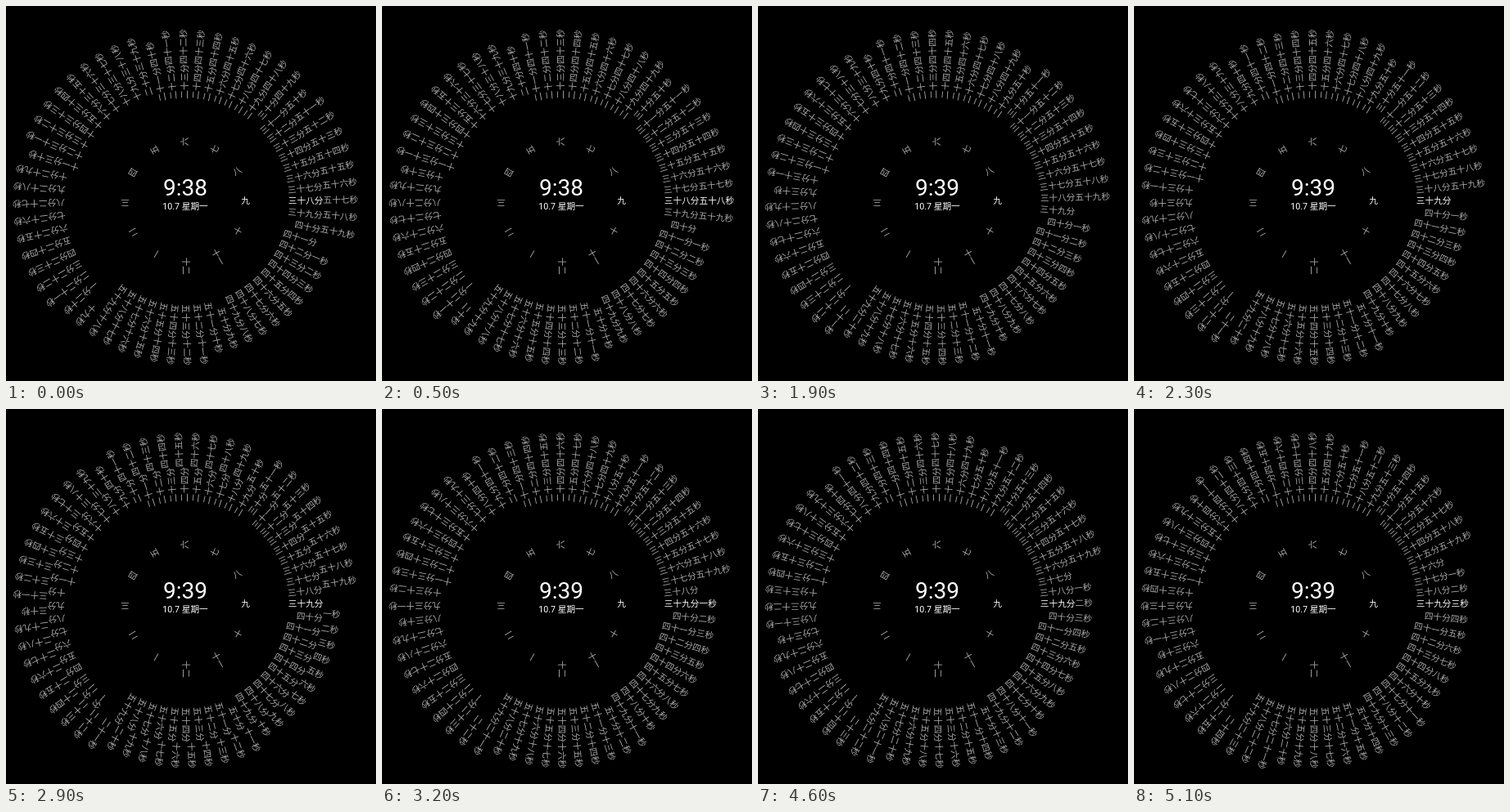
An HTML page with a canvas that plays this animation: 452 by 459 pixels, repeating every 5.4 s.

```html
<!DOCTYPE html>
<html lang="zh-CN">
<head>
<meta charset="utf-8">
<title>文字时钟</title>
<style>
  html, body { margin: 0; width: 100%; height: 100%; overflow: hidden; background: #000; }
  canvas { display: block; width: 452px; height: 459px; }
</style>
</head>
<body>
<canvas id="clock"></canvas>
<script>
const W = 452, H = 459, LOOP = 5400, TICK = 100;
const CX = 219, CY = 239.5, SIZE = 10.67, BASELINE = 2.9;
const HOUR_R = 68.2, SPLIT_R = 168.5; // minutes end and seconds begin at SPLIT_R
const DIM = '#aaa', LIT = '#fff';
const FONT = 'Roboto, "Noto Sans CJK SC", "Noto Sans CJK", sans-serif';

// Start and length of each one-second turn
const TURNS = [[-100, 600], [800, 600], [1700, 600], [2700, 500], [3600, 600], [4500, 600]];
const MINUTE_TURN = 2;

const canvas = document.getElementById('clock');
const ctx = canvas.getContext('2d');
const dpr = window.devicePixelRatio || 1;
canvas.width = W * dpr;
canvas.height = H * dpr;
ctx.scale(dpr, dpr);

const DIGITS = '零一二三四五六七八九';

function han(n) {
  const tens = Math.floor(n / 10), unit = n % 10;
  return (tens > 1 ? DIGITS[tens] : '') + (tens ? '十' : '') + (unit ? DIGITS[unit] : '');
}

function ease(x) {
  return (1 - Math.cos(Math.PI * Math.min(1, Math.max(0, x)))) / 2;
}

// Draws count labels around the centre, with position `at` pointing right
function ring(count, at, radius, align, unit) {
  ctx.font = `${SIZE}px ${FONT}`;
  ctx.textAlign = align;
  for (let i = 1; i <= count; i++) {
    if (unit && i === count) continue; // zero stays blank
    const offset = (i - at) % count;
    ctx.save();
    ctx.translate(CX, CY);
    ctx.rotate(offset * 2 * Math.PI / count);
    ctx.fillStyle = Math.abs(offset) < 1e-6 ? LIT : DIM;
    ctx.fillText(han(i) + unit, radius, BASELINE);
    ctx.restore();
  }
}

function label(text, size, y) {
  ctx.font = `${size}px ${FONT}`;
  ctx.textAlign = 'center';
  ctx.fillStyle = LIT;
  ctx.fillText(text, CX, y);
}

function draw(t) {
  const turns = TURNS.map(([start, length]) => ease((t - start) / length));
  const second = 57 + turns.reduce((sum, x) => sum + x, 0);
  const minute = 38 + turns[MINUTE_TURN];

  ctx.fillStyle = '#000';
  ctx.fillRect(0, 0, W, H);
  ring(12, 9, HOUR_R, 'left', '');
  ring(60, minute, SPLIT_R, 'right', '分');
  ring(60, second, SPLIT_R, 'left', '秒');
  label('9:' + Math.ceil(minute), 28, 232);
  label('10.7 星期一', SIZE, 249.4);
}

const begin = performance.now();

function frame() {
  const t = (performance.now() - begin) % LOOP;
  draw(Math.floor(t / TICK) * TICK);
  requestAnimationFrame(frame);
}
frame();
</script>
</body>
</html>
```
